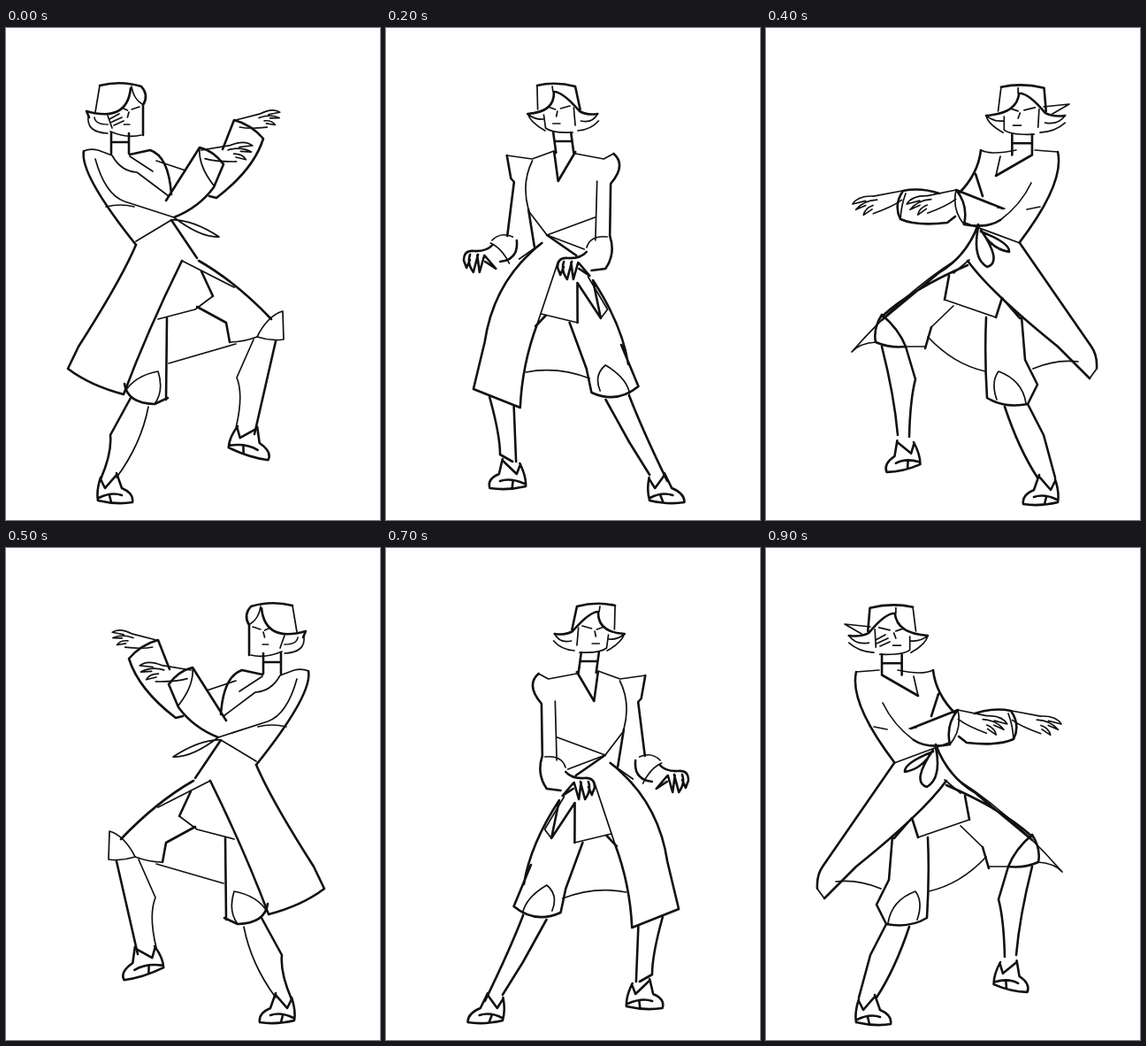
Recreate the animation shown at these times as an HTML page without scripts. Size 423x556 px, loop 1000 ms.

```html
<!DOCTYPE html>
<html lang="en">
<head>
<meta charset="utf-8">
<title>Turning fighter</title>
<style>
html, body { margin: 0; width: 100%; height: 100%; overflow: hidden; background: #fff; }
svg { display: block; width: 100%; height: 100%; fill: none; stroke: #111; stroke-width: 1.7; stroke-linecap: round; stroke-linejoin: round; }
path { vector-effect: non-scaling-stroke; }
.bold { stroke-width: 2.6; }
.flip { transform: translateX(430px) scaleX(-1); }
.pose { visibility: hidden; animation: show 1s step-end calc(var(--i) * 100ms - 1s) infinite; }
@keyframes show { 0% { visibility: visible; } 10%, 100% { visibility: hidden; } }
</style>
</head>
<body>
<svg viewBox="0 0 423 556">
<defs>
  <!-- shared parts -->
  <path id="reach" d="M0 0L33-2Q50-7 58 1L43 1M30 3Q45 0 56 8L44 6M36 8Q46 9 49 16L38 12M3 10Q15 15 38 17"/>
  <path id="claw" class="bold" d="M0 0Q-8 8-22 7-34 6-35 18l2 8 5-9M-27 11q-5 10 1 20l8-20M-19 12v19l8-19M-10 13l10 14-11-8"/>
  <path id="foot" class="bold" d="M0 0Q-5 15-3 26 18 31 36 28 38 18 24 12L18-5M0 2L5 12 18-3M-2 23Q12 16 24 20M10 20l2 8"/>
  <path id="neck" class="bold" d="M0 0v23M20 0v23M0 10h20"/>
  <path id="face" d="M0 0l8 3M14 2l11-3M10 5l-2 6M3 19h8"/>
  <path id="scar" d="M0 4l11-6M1 8l13-6M5 11l11-5"/>

  <g id="bunHead">
    <path d="M119 65L114 95M155 66Q157 80 167 86M128 99L133 113M131 117Q150 125 166 121M106 100Q104 118 128 119M113 101Q114 109 128 109"/>
    <path class="bold" d="M119 65Q143 59 166 66 175 76 168 87V121M104 94Q150 107 154 68M104 94L107 101"/>
    <use href="#face" transform="translate(144 90) scale(.8 1)"/>
    <use href="#neck" x="132" y="119"/>
  </g>
  <g id="bobHead">
    <path d="M234 65L231 92M251 66V72M219 97Q226 104 236 103M219 97Q221 107 236 116M298 97Q291 108 278 105M298 105Q288 115 273 116M237 98V113Q243 119 267 118M272 90L271 110"/>
    <path class="bold" d="M234 65Q255 60 277 66L279 92M252 72Q250 95 219 97M252 72Q262 72 278 94 286 99 298 97"/>
    <use href="#face" x="243" y="89"/>
    <use href="#neck" x="245" y="118"/>
  </g>

  <!-- knee up, weight back -->
  <g id="lift">
    <use href="#bunHead" x="-13"/>
    <path d="M88 139Q95 136 104 138L120 144Q130 162 148 163L184 190M140 145L166 162M170 150L203 161M113 202Q130 198 145 202M101 148Q112 188 134 196L190 214M219 135Q217 155 235 178"/>
    <path class="bold" d="M88 139Q83 165 147 245M140 143L163 138Q184 145 187 188M181 195L219 135Q235 139 246 154L235 180Q218 203 190 214M245 137L258 104Q277 109 291 125 280 160 238 192L230 190"/>
    <use href="#reach" transform="translate(221 138) rotate(-6)"/>
    <use href="#reach" transform="translate(260 104) rotate(-11) scale(.87)"/>
    <path d="M147 241L187 217Q210 216 241 236 220 237 190 214M199 263L258 293M172 329L214 318 234 303M184 379L260 357M253 355Q268 355 284 349"/>
    <path class="bold" d="M187 217L216 260M147 245Q130 285 82 360L70 385Q95 404 133 414 160 342 199 263M218 263Q260 287 300 329M221 275L234 303M216 315L249 333 253 355"/>
    <path d="M284 349Q296 325 313 320L314 352Q299 354 284 349M280 352L261 395Q269 415 260 452M134 412Q145 393 172 388 179 410 168 425M161 428Q153 470 125 508"/>
    <path class="bold" d="M305 354L281 459M182 328L181 420M134 402Q137 424 168 425L183 418M141 418L118 460Q120 480 107 510"/>
    <use href="#foot" x="107" y="508"/>
    <use href="#foot" transform="translate(262 450) rotate(15) scale(1.2 1)"/>
  </g>

  <!-- planted lunge -->
  <g id="lunge">
    <use href="#bunHead"/>
    <path d="M114 131L123 131 133 139 154 147M120 135Q140 153 183 190M154 146L197 181M188 154L206 160M125 203L145 201M127 160Q126 178 138 191M228 141Q226 165 248 180M273 118L291 132"/>
    <path class="bold" d="M114 131Q104 155 115 190L148 250M154 140Q186 131 188 155M128 182L175 220 248 180Q247 153 228 141L177 190M256 140L274 115Q286 129 303 138 283 176 238 200"/>
    <use href="#reach" x="230" y="142"/>
    <use href="#reach" transform="translate(274 115) rotate(-6) scale(.9)"/>
    <path d="M145 241L187 218M190 216Q228 228 223 255 212 262 190 216M205 224Q219 240 217 258M198 246L197 320M198 260L215 268M197 325L233 313M204 387L250 398M250 380Q265 388 304 386"/>
    <path class="bold" d="M190 216L217 262Q270 300 291 350M148 250L152 285M148 265Q122 310 115 420 135 433 212 437 198 380 197 320M219 272L233 313M214 318L243 342 250 380M250 398L253 380"/>
    <path class="bold" d="M296 347L308 377 303 386H282Q283 365 296 347M275 387L274 425Q289 452 288 478M303 387L305 488M129 429L117 460 107 508M157 436Q150 475 126 504"/>
    <use href="#foot" x="107" y="507"/>
    <use href="#foot" transform="translate(288 487) scale(1.55 1)"/>
  </g>

  <!-- facing front -->
  <g id="front">
    <use href="#bobHead"/>
    <path d="M189 144L217 148 243 139M267 142L298 148 310 142M217 150Q201 175 205 205M287 173L276 240M205 207L222 234 279 214M222 234L262 250M159 240Q170 230 183 236M157 243Q169 249 175 266M265 248Q271 234 290 236M187 261L215 243"/>
    <path class="bold" d="M243 140V173L267 140M189 144L190 170 193 174 177 235M310 142Q323 155 302 176L293 235Q297 255 283 272L267 274M205 205L206 247M187 240Q186 262 165 264M222 234L252 257"/>
    <use href="#claw" x="159" y="245"/>
    <use href="#claw" x="264" y="253"/>
    <path d="M203 323L243 333M177 389Q213 382 248 396M197 335L230 265M262 281L279 318 270 328M258 410Q253 392 268 381 290 395 291 413"/>
    <path class="bold" d="M215 243Q155 285 135 355L115 408 165 429Q174 380 197 335M243 333L249 288 270 328 267 285Q293 335 294 380M208 325L195 337M234 333L246 385 248 412Q275 425 302 405L289 358"/>
    <path class="bold" d="M132 417Q138 460 135 482L148 490M158 428L152 490M263 420L283 468 301 505M290 415Q300 455 320 512"/>
    <use href="#foot" transform="translate(156 492) scale(-1.05 1)"/>
    <use href="#foot" x="300" y="508"/>
  </g>

  <!-- arms sweeping across -->
  <g id="sweep">
    <use href="#bobHead" transform="translate(1.5 1) scale(1.13 1.01)"/>
    <path d="M243 138Q255 144 283 138M265 145L260 167M304 138L330 140M300 175Q288 200 265 217M262 203L270 204M295 205L310 202M158 187Q153 200 152 216M215 183Q210 205 224 222M314 89L343 86 324 97"/>
    <path class="bold" d="M243 138Q240 165 218 187M260 167L300 144M237 165L245 190M330 140Q338 175 287 242M268 204L215 183Q229 200 224 222 250 227 265 217M196 187Q175 180 155 184 144 200 152 216 170 224 205 220L214 213"/>
    <use href="#reach" transform="translate(215 183) scale(-1 1) rotate(15)"/>
    <use href="#reach" transform="translate(154 184) scale(-1 1) rotate(14)"/>
    <path d="M225 220L287 243M97 366Q106 356 125 355M366 396L374 385M230 262L212 277M202 307L260 327M183 349Q212 380 248 388M302 385Q328 374 353 377M215 262Q155 300 97 366M158 360H181M187 338L212 314"/>
    <path class="bold" d="M240 225Q233 260 250 270 268 265 243 228 255 250 275 253 276 243 243 230M240 222Q227 258 195 277L131 330M287 243L368 360Q375 370 374 385M228 263Q255 300 330 360L366 396M131 326Q165 295 228 268M207 280L202 307M260 327L267 305 287 328M187 338L180 362"/>
    <path d="M261 420Q254 400 263 388 290 398 294 424"/>
    <path class="bold" d="M131 324Q121 340 124 355 140 362 158 360 150 340 131 324M131 360Q145 415 149 460M158 360L169 397Q163 420 162 462M249 327Q247 370 250 418 270 430 296 425L307 403 293 375 289 326M270 428Q286 476 307 508M296 425L314 460 327 508"/>
    <use href="#foot" transform="translate(167 468) scale(-1 1) rotate(10)"/>
    <use href="#foot" transform="translate(327 510) scale(-1 1)"/>
  </g>

  <!-- between lunge and front: body leans back over planted feet -->
  <g id="turn"><use href="#front" transform="translate(-72) skewX(7.8)"/></g>
</defs>

<g class="pose" style="--i:0"><use href="#lift"/><use href="#scar" x="117" y="99"/></g>
<g class="pose" style="--i:1"><use href="#lunge"/><use href="#scar" x="136" y="99"/></g>
<g class="pose" style="--i:2"><use href="#turn"/></g>
<g class="pose" style="--i:3"><use href="#front"/></g>
<g class="pose" style="--i:4"><use href="#sweep"/></g>
<g class="pose" style="--i:5"><use class="flip" href="#lift"/></g>
<g class="pose" style="--i:6"><use class="flip" href="#lunge"/></g>
<g class="pose" style="--i:7"><use class="flip" href="#turn"/></g>
<g class="pose" style="--i:8"><use class="flip" href="#front"/><use href="#scar" x="156" y="99"/></g>
<g class="pose" style="--i:9"><use class="flip" href="#sweep" x="-2"/><use href="#scar" x="124" y="100"/></g>
</svg>
</body>
</html>
```
